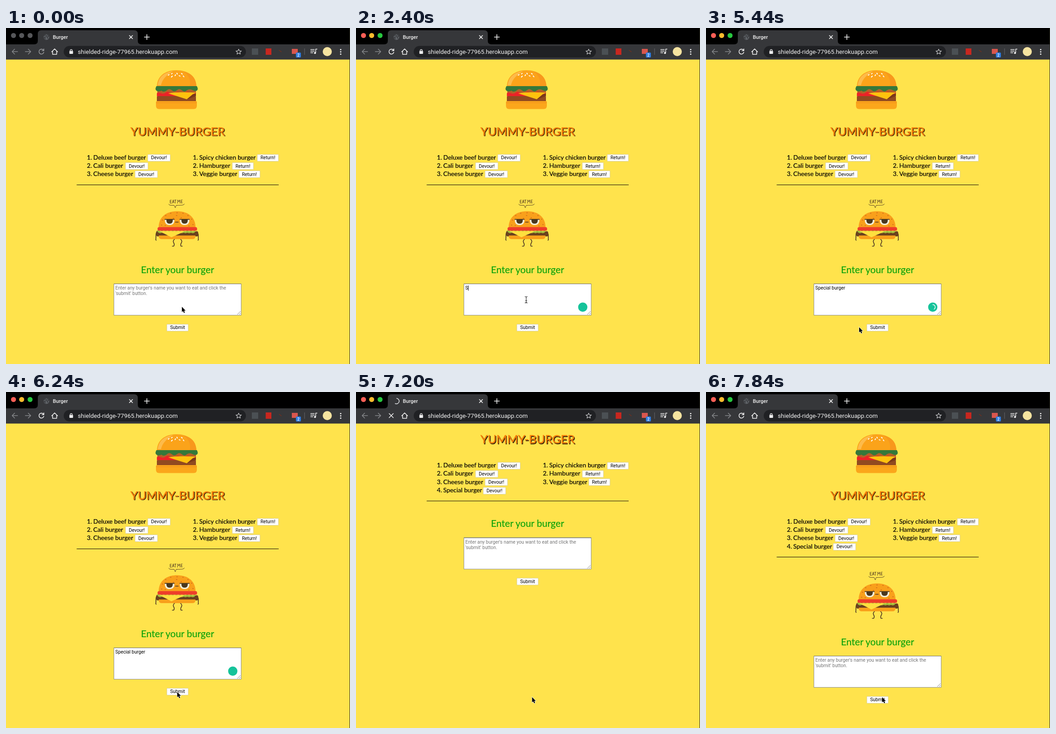
Write an HTML page that moves like this. It is 757x740 px and loops after 8000 ms.

```html
<!DOCTYPE html>
<html lang="en">
<head>
<meta charset="utf-8">
<title>Burger</title>
<style>
html, body { margin: 0; height: 100%; overflow: hidden; background: #ffe34c }
svg { display: block; width: 100vw; height: 100vh }
text { white-space: pre }
.ui { font: 10.35px Roboto, sans-serif }
.item { font: 13.8px Lato, sans-serif; stroke: #000; stroke-width: .2 }
.title { font: 25.7px Lato, sans-serif; text-anchor: middle; stroke-width: .4 }
.ask { font: 21px Lato, sans-serif; text-anchor: middle; fill: #0ba30b; stroke: #0ba30b; stroke-width: .2 }
.mid { text-anchor: middle }
.line { fill: none; stroke-linecap: round; stroke-linejoin: round }
</style>
</head>
<body>
<svg viewBox="0 0 757 740">
  <rect width="757" height="740" fill="#ffe34c"/>

  <!-- browser bar -->
  <rect width="757" height="36" fill="#000"/>
  <path d="M62 36q8 0 8-8V13q0-8 8-8H282q8 0 8 8V28q0 8 8 8H757V69.500H0V36Z" fill="#36373a"/>
  <g id="lights"><circle cx="16.500" cy="16.500" r="5.500"/><circle cx="34.500" cy="16.500" r="5.500"/><circle cx="53" cy="16.500" r="5.500"/></g>
  <g id="globe"><circle cx="89" cy="20" r="6.200" fill="#5f6368"/><path d="M84 17q4-3 5 0t-3 3 1 4M91 15l3 3-3 2 1 3" class="line" stroke="#36373a" stroke-width="1.600"/></g>
  <path id="spin" class="line" stroke-width="1.600"/>
  <text x="103" y="24" style="font:500 11.1px Roboto,sans-serif" fill="#f1f1f1">Burger</text>
  <g class="line" stroke="#f1f1f1" stroke-width="1.600">
    <path d="M271.500 16.500l7 7m0-7l-7 7M304.500 20h11m-5.500-5.500v11"/>
    <path d="M25.500 52H13.500m5.500-5.500L13.500 52l5.500 5.500M42.500 52h12m-5.500-5.500l5.500 5.500-5.500 5.500" stroke="#85878a"/>
    <path id="reload" d="M82.500 49A5.400 5.400 0 1 0 83.200 53.500M83.300 46v4h-4"/>
    <path id="stop" d="M73 47.500l9 9m0-9l-9 9"/>
    <path d="M100.500 52.500l6.500-6.500 6.500 6.500M102.500 51v7h9v-7"/>
  </g>
  <rect x="127" y="39.500" width="401" height="25.500" rx="12.750" fill="#202124"/>
  <rect x="139.500" y="50.500" width="8" height="6.500" rx="1" fill="#eee"/>
  <path d="M141.300 51v-1.500a2.200 2.200 0 0 1 4.400 0V51" class="line" stroke="#eee" stroke-width="1.200"/>
  <text x="158" y="56.500" style="font:13.3px Roboto,sans-serif" fill="#f4f4f4">shielded-ridge-77965.herokuapp.com</text>
  <path d="M512 46.500l1.700 3.800 4.200.4-3.200 2.700 1 4.100-3.700-2.200-3.700 2.200 1-4.100-3.200-2.700 4.200-.4Z" class="line" stroke="#c8c9cb" stroke-width="1.200"/>
  <rect x="541" y="45" width="14" height="14" fill="#4b5054"/>
  <rect x="571.500" y="45" width="12.500" height="14" fill="#c9271f"/>
  <path d="M601 49l5 3.500" class="line" stroke="#78301c" stroke-width="1.300"/>
  <rect x="629" y="46" width="13" height="11" fill="#d9564d"/>
  <rect x="638" y="54" width="11" height="11" rx="2" fill="#2f7de1"/>
  <text x="643.500" y="62.500" class="mid" style="font:500 8.5px Roboto,sans-serif" fill="#fff">2</text>
  <path d="M657 45v14" stroke="#66686b"/>
  <path d="M670.500 47.500h8m-8 3.500h8m-8 3.500h5M681.500 54v-7.500h3" class="line" stroke="#eee" stroke-width="1.500"/>
  <circle cx="680" cy="55" r="2.200" fill="#eee"/>
  <circle cx="707" cy="52" r="10" fill="#f5e3a0"/>
  <g fill="#eee"><circle cx="736.500" cy="47.500" r="1.600"/><circle cx="736.500" cy="52.500" r="1.600"/><circle cx="736.500" cy="57.500" r="1.600"/></g>

  <!-- page -->
  <g id="logo">
    <path d="M332 130C332 106 350 93 375 93S418.500 106 419 130Z" fill="#fba31a"/>
    <path d="M334 126C336 108 348 97 368 95C353 103 344 113 341 126Z" fill="#fdbb4a"/>
    <path d="M390 95C414 101 419 116 419 130H404C408 115 402 103 390 95Z" fill="#f8981c"/>
    <path d="M357 104l2-1.500M364 108l2-2M364 101l2-1M372 105l1-2M376 99.500l1 2M381 105l2 1M386 100l2 1.500M390 105.500l1.500 2" class="line" stroke="#fff" stroke-width="1.900"/>
    <rect x="333" y="134" width="85" height="13" fill="#b65f28"/>
    <path d="M332 143.500q4-3 9 0t10-1 11 0 11 0 10 0 11 0 11 0 13 0V150H332Z" fill="#ed2227"/>
    <rect x="332" y="150" width="86" height="12" rx="1.500" fill="#914a20"/>
    <path d="M357 144Q376 140 418 142.500L411 146L398 157Z" fill="#ffc20e"/>
    <path d="M398 157l13-11 7-2v6Z" fill="#7b3919"/>
    <path d="M331 128H420Q424 135 420 138Q415 140 411 137Q404 133 398 137Q393 143 387 137Q381 132 376 137Q370 142 365 137Q359 132 354 137Q348 143 342 138Q336 141 331 138Q327 135 331 128Z" fill="#35783a"/>
    <path d="M332 161H419Q420 161 420 164V171Q420 178.500 413 178.500H337Q330 178.500 330 171V164Q330 161 332 161Z" fill="#fba61b"/>
    <path d="M330 164.500H420" stroke="#f2921c" stroke-width="1.500"/>
  </g>
  <g id="top">
    <text class="title" x="379.200" y="238" fill="#3a2410" stroke="#3a2410">YUMMY-BURGER</text>
    <text class="title" x="377.700" y="236.500" fill="#f77f08" stroke="#f77f08">YUMMY-BURGER</text>
  </g>
  <g id="low">
    <path d="M155.500 345.500H600" stroke="#000"/>
    <g id="hero">
      <g class="line" stroke="#4a3420" stroke-width=".9">
        <path d="M358 388q1 3 6 2.500l6 0 2.500 5.500 2-5.500q11 0 14-.5t4-2.500"/>
        <path d="M364 379l-3 .3.300 6.700 3-.4m-2.800-3.200l2.300-.2M366 386l2-7.500 2 7m-3.300-2.200h3M370.500 379.200l4-.5m-2 .4l.3 6.800M377.500 386l.6-7.500 2.200 4.500 2-4.500.7 7.500M388 378.700l-2.800.2.200 6.500 2.800-.3m-2.800-2.900h2.300"/>
        <path d="M333 447C328 453 331 459 329.500 466l1 1.500M420 448C426 455 422 460 423.500 466l-1 1.500M371 465q-4.500 4-2 8t0 7.500h-3M384 465q4.500 4 2 8t-1 7.500h3" stroke-width="1.600"/>
      </g>
      <path d="M336 441C335 418 351 403.500 376.500 403.500S418 418 417 441Z" fill="#f9a01b"/>
      <path d="M351 413h1M362 408h1M375 413h1M389 408h1M400 413h1M368 419h1M385 418h1M408 421h1M344 423h1M342 434h1M376 407h1M411 433h1M350 435h1M402 436h1" class="line" stroke="#d5721d" stroke-width="1.900"/>
      <g id="eye">
        <path d="M349.500 422H370.500Q371 434 360 434T349.500 422Z" fill="#f2f0dc"/>
        <path d="M353 422H367Q367.500 431 360 431T353 422Z" fill="#4a3820"/>
        <path d="M349 421.500H371" stroke="#4a3820" stroke-width="1.800"/>
      </g>
      <use href="#eye" x="33"/>
      <path d="M373 427.500h6" class="line" stroke="#4a3020" stroke-width="1.700"/>
      <rect x="331" y="448" width="92" height="11" rx="3" fill="#6b421e"/>
      <path d="M336 457H417Q417 465 411 465H342Q336 465 336 457Z" fill="#f9a01b"/>
      <path id="lettuce" class="line" stroke="#a3bf3b" stroke-width="4"/>
      <path d="M338 447.500H394L364 461Z" fill="#ffdf3f"/>
      <rect x="333.500" y="438.500" width="87" height="8" rx="3.500" fill="#ee3e2a"/>
    </g>
  </g>
  <g id="form">
    <text class="ask" x="377.500" y="539.800">Enter your burger</text>
    <rect x="237.500" y="563.500" width="280" height="69" fill="#fff" stroke="#8a8c90"/>
    <path d="M237.500 563.500H517.500" stroke="#66686c"/>
    <path d="M509 631l7-7M513 631l3-3" stroke="#777" stroke-width=".9"/>
    <g id="hint" class="ui" fill="#757575"><text x="240.500" y="576.300">Enter any burger's name you want to eat and click the</text><text x="240.500" y="588.300">'submit' button.</text></g>
    <text id="typed" class="ui" x="240.500" y="576.300"></text>
    <path id="caret" stroke="#000"/>
    <circle id="badge" cx="499" cy="614.700" r="10.200" fill="#15c39a"/>
    <path id="busy" class="line" d="M499 609.200a5.500 5.500 0 0 1 3 10" stroke="#fff" stroke-width="1.400"/>
  </g>
  <path d="M756.500 0V740" stroke="#2b2a20"/>

  <!-- pointer -->
  <g id="pointer">
    <circle id="ring" r="15.500" fill="none" stroke="#111" stroke-width="1.100"/>
    <path id="arrow" d="M0 0V11.500L2.600 9.200 4.500 13.600 6.600 12.700 4.700 8.400H8.200Z" stroke="#fff" stroke-width="1.200" paint-order="stroke"/>
    <path id="beam" class="line" d="M-2.500-7Q0-7 0-5V5Q0 7-2.500 7M2.500-7Q0-7 0-5M0 5Q0 7 2.500 7M-1.500 2h3" stroke="#222" stroke-width="1.100"/>
  </g>
</svg>
<script>
const $ = id => document.getElementById(id);
const show = (id, on) => $(id).style.display = on ? '' : 'none';
const shift = (id, x, y) => $(id).setAttribute('transform', `translate(${x} ${y})`);

const LOOP = 8000, ROW = 18.3;
const WORDS = 'Special burger';
const LIGHTS = ['#ff5f57', '#febc2e', '#28c840'];

const button = (x, y, w, label) =>
  `<rect x="${x}" y="${Math.round(y - 8) + .5}" width="${w}" height="15" rx="1" fill="#fff" stroke="#d2cca4" stroke-width=".9"/>
   <text class="ui mid" x="${x + w / 2}" y="${y + 3.7}">${label}</text>`;

function row(n, x, name, buttonX, label, w) {
  const y = 285.6 + (n - 1) * ROW;
  return `<g id="${label[0]}${n}"><text class="item" x="${x}" y="${y + 4}">${n}.</text>
    <text class="item" x="${x + 14}" y="${y + 4}">${name}</text>${button(buttonX, y, w, label)}</g>`;
}

const uneaten = [['Deluxe beef burger', 312], ['Cali burger', 263], ['Cheese burger', 284], [WORDS, 280]];
const eaten = [['Spicy chicken burger', 553], ['Hamburger', 498], ['Veggie burger', 512.3]];
$('top').insertAdjacentHTML('beforeend',
  uneaten.map(([s, x], i) => row(i + 1, 178, s, x, 'Devour!', 49.4)).join('') +
  eaten.map(([s, x], i) => row(i + 1, 411.3, s, x, 'Return!', 46.6)).join(''));
$('form').insertAdjacentHTML('beforeend', button(354, 659.7, 47, 'Submit'));
$('lettuce').setAttribute('d', 'M335 447.5' + 'q4 5 8 0'.repeat(10));

// time, x, y
const path = [[160, 387, 614], [480, 374.5, 598.5], [4640, 374.5, 598.5], [5440, 337, 659],
  [5760, 337, 659], [6400, 384, 661], [6640, 384, 661], [6880, 387.5, 672]];

function pointerAt(t) {
  const i = path.findIndex(p => p[0] > t);
  if (i < 0) return path[path.length - 1].slice(1);
  if (!i) return path[0].slice(1);
  const [a, x, y] = path[i - 1], [b, u, v] = path[i];
  let k = (t - a) / (b - a);
  k = k * k * (3 - 2 * k);
  return [x + (u - x) * k, y + (v - y) * k];
}

function typedCount(t) {
  if (t < 2400 || t >= 7200) return 0;
  return t < 3680 ? Math.min(8, 1 + Math.floor((t - 2400) / 160))
                  : Math.min(14, 8 + Math.floor((t - 3680) / 133));
}

function caretOn(t) {
  if (t < 1600 || t >= 6560) return false;
  if (t < 2400) return t < 2080;
  return t < 4480 || (t - 4480) % 1000 < 500;
}

function arc(from, to, r = 6) {
  const at = d => {
    const a = d * Math.PI / 180;
    return `${89 + r * Math.cos(a)} ${20 + r * Math.sin(a)}`;
  };
  return `M${at(from)}A${r} ${r} 0 ${to - from > 180 ? 1 : 0} 1 ${at(to)}`;
}

function draw(t) {
  const active = t >= 320;
  [...$('lights').children].forEach((c, i) => c.setAttribute('fill', active ? LIGHTS[i] : '#56575a'));
  $('reload').setAttribute('stroke', active ? '#f1f1f1' : '#97999c');

  const loading = t >= 6880 && t < 7520, waiting = t < 7200;
  show('reload', !loading);
  show('stop', loading);
  show('globe', !loading);
  show('spin', loading);
  const turn = waiting ? 180 - (t - 7040) * .4 : -85 + (t - 7200) * .5;
  $('spin').setAttribute('d', arc(turn, turn + (waiting ? 130 : 200)));
  $('spin').setAttribute('stroke', waiting ? '#96999d' : '#dfe1e5');

  // the new page first lays out without its pictures
  const added = t >= 7200, bare = added && t < 7360;
  const up = bare ? -123.5 : 0, down = added ? 18 : 0;
  show('logo', !bare);
  show('hero', !bare);
  show('D4', added);
  shift('top', 0, up);
  shift('low', 0, up + down);
  shift('form', 0, bare ? -242.5 : down);

  const n = typedCount(t);
  show('hint', !n);
  $('typed').textContent = WORDS.slice(0, n);
  const x = 241 + (n ? $('typed').getComputedTextLength() : 0);
  $('caret').setAttribute('d', `M${x} 567V578.5`);
  show('caret', caretOn(t));
  show('badge', t >= 1760 && t < 7200);
  show('busy', t >= 4640 && t < 5680);
  $('busy').setAttribute('transform', `rotate(${(t - 5440) * .45} 499 614.7)`);

  const [px, py] = pointerAt(t), beam = active && py < 633;
  shift('pointer', px, py);
  show('beam', beam);
  show('arrow', !beam);
  show('ring', t >= 1440 && t < 1760 || t >= 6480 && t < 6720);
}

const start = performance.now();
function tick() {
  draw((performance.now() - start) % LOOP);
  requestAnimationFrame(tick);
}
tick();
</script>
</body>
</html>
```
